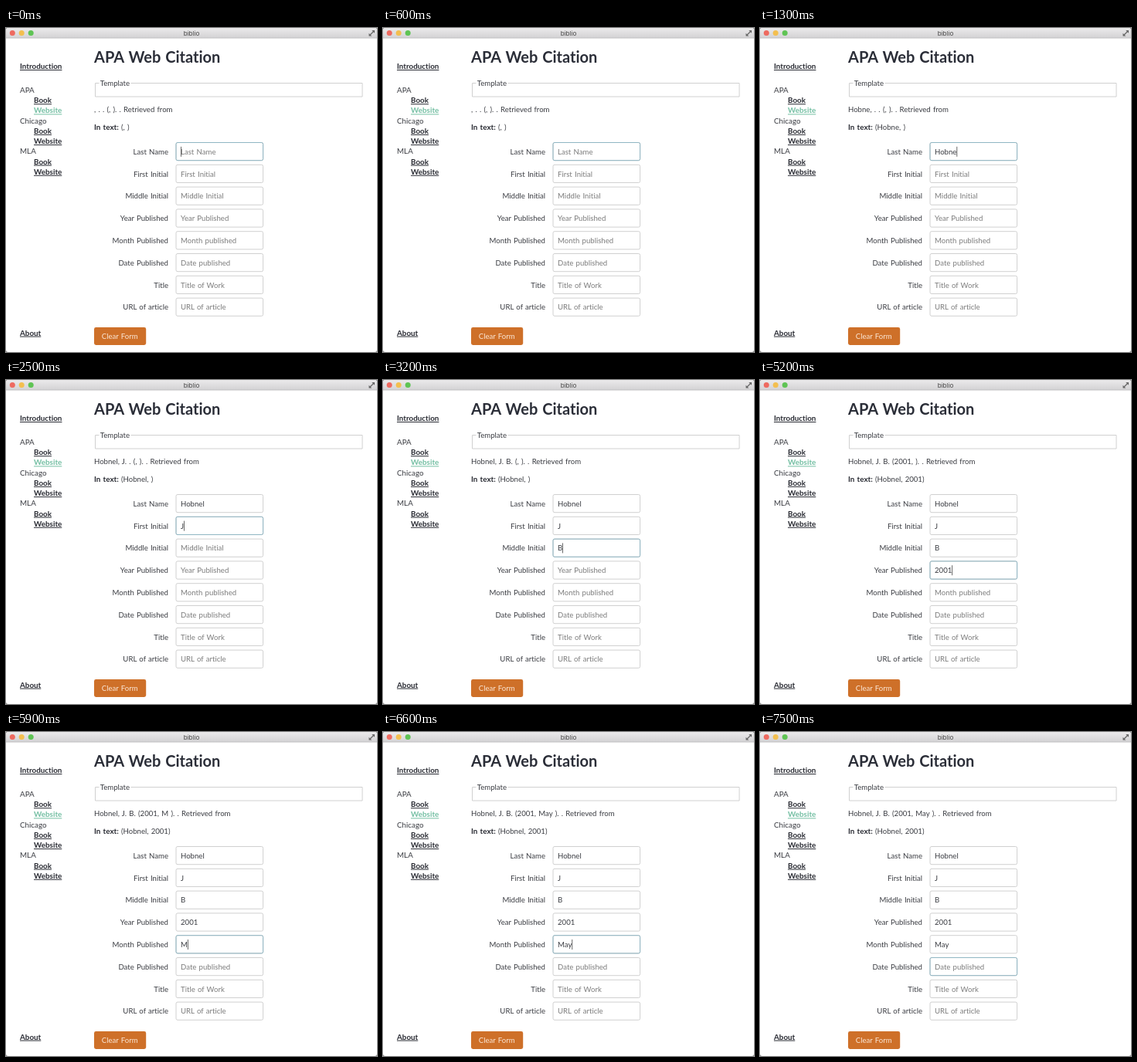
Animation of 480x420 px, one loop 8000 ms. Source, as an HTML page:

```html
<!DOCTYPE html>
<html lang="en">
<head>
<meta charset="utf-8">
<title>biblio</title>
<style>
  html, body { margin: 0; height: 100%; overflow: hidden; background: #8d8d8d; }
  svg { display: block; width: 480px; height: 420px; }
  text {
    font: 9.6px Lato, "Open Sans", sans-serif; font-variant-ligatures: none;
    word-spacing: .8px; fill: #3a3c42;
  }
  .bold { font-size: 9.85px; font-weight: 700; fill: #292b33; }
  .link { text-decoration: underline; }
  .active { fill: #74bfa3; }
  .side { font-size: 9.8px; }
  .label { text-anchor: end; }
  .hint { fill: #7c7c7c; }
  .box { fill: #fff; stroke: #d0d0d0; }
  .focus { fill: none; stroke: #8fb6c3; }
</style>
</head>
<body>
<svg id="stage" viewBox="0 0 480 420">
  <defs>
    <linearGradient id="bar" x2="0" y2="1">
      <stop stop-color="#ebeaeb"/><stop offset="1" stop-color="#d3d2d4"/>
    </linearGradient>
  </defs>
  <rect width="480" height="420" rx="3" fill="#fff"/>
  <path d="M0 13V3Q0 0 3 0H477Q480 0 480 3V13Z" fill="url(#bar)"/>
  <path d="M0 13H480" stroke="#b9b8ba" stroke-width=".8"/>
  <circle cx="8.3" cy="6.5" r="3.5" fill="#ee6a60"/>
  <circle cx="20.2" cy="6.5" r="3.5" fill="#f3bf4f"/>
  <circle cx="32.2" cy="6.5" r="3.5" fill="#5fc454"/>
  <text x="240" y="9.5" text-anchor="middle" style="font:8.1px Inter,sans-serif;fill:#454545">biblio</text>
  <path d="M473.2 3H477V6.8ZM469.5 6.7V10.5H473.3Z" fill="#666"/>
  <path d="M470.5 9.5L476 4" stroke="#666" stroke-width="1.2"/>

  <text x="114" y="45" class="bold" style="font-size:20px;word-spacing:1.2px;fill:#2b2e38">APA Web Citation</text>
  <path d="M120.5 71.5H115.5V89H461V71.5H161.5" fill="none" stroke="#d0d0d0"/>
  <text x="121.7" y="75">Template</text>
  <text id="cite" x="114" y="109"></text>
  <text x="114" y="131.7" class="bold">In text:</text>
  <text id="inText" x="149" y="131.7"></text>

  <rect x="114" y="388" width="67.2" height="23" rx="2.4" fill="#ce7029"/>
  <text x="123.8" y="403.2" style="fill:#fbe8d8">Clear Form</text>
</svg>
<script>
const LOOP = 8000, ROW = 28.8, TOP = 160.3, TEXT_X = 226;
const stage = document.getElementById('stage');
const cite = document.getElementById('cite');
const inText = document.getElementById('inText');

function add(tag, attrs, text = '') {
  const el = document.createElementNS('http://www.w3.org/2000/svg', tag);
  for (const key in attrs) el.setAttribute(key, attrs[key]);
  el.textContent = text;
  return stage.appendChild(el);
}

// Sidebar
const link = (x, y, text, extra = '') => add('text', { x, y, class: 'bold link ' + extra }, text);
link(18, 53, 'Introduction');
['APA', 'Chicago', 'MLA'].forEach((style, i) => {
  const y = 84 + i * 39.7;
  add('text', { x: 18, y, class: 'side' }, style);
  link(36, y + 13.2, 'Book');
  link(36, y + 26.4, 'Website', i ? '' : 'active');
});
link(18, 398.6, 'About');

// Form
const fields = [
  ['Last Name', 'Last Name'], ['First Initial', 'First Initial'],
  ['Middle Initial', 'Middle Initial'], ['Year Published', 'Year Published'],
  ['Month Published', 'Month published'], ['Date Published', 'Date published'],
  ['Title', 'Title of Work'], ['URL of article', 'URL of article']
].map(([label, hint], i) => {
  const y = TOP + i * ROW;
  const box = cls => add('rect', { x: 220, y: y - 11.8, width: 112.6, height: 23.2, rx: 2, class: cls });
  add('text', { x: 210, y: y + 3.4, class: 'label' }, label);
  box('box');
  return { hint, y, ring: box('focus'), text: add('text', { x: TEXT_X, y: y + 3.4 }) };
});
const caret = add('rect', { width: .8, height: 13, fill: '#444' });

// When each field gains focus, and when each of its keys is pressed
const steps = [
  { at: -1000, word: 'Hobnel', keys: [900, 1000, 1100, 1200, 1300, 1500] },
  { at: 1700, word: 'J', keys: [2300] },
  { at: 2700, word: 'B', keys: [3100] },
  { at: 3300, word: '2001', keys: [4500, 4700, 4900, 5100] },
  { at: 5300, word: 'May', keys: [5700, 6100, 6300] },
  { at: 7000, word: '', keys: [] }
];
const FADE = 150;
const clamp = v => Math.max(0, Math.min(1, v));

function draw(t) {
  const values = steps.map(s => s.word.slice(0, s.keys.filter(k => k <= t).length));
  const current = steps.filter(s => s.at <= t).length - 1;

  fields.forEach((f, i) => {
    const value = values[i] || '';
    f.text.textContent = value || f.hint;
    f.text.setAttribute('class', value ? '' : 'hint');
    const gain = i < steps.length ? clamp((t - steps[i].at) / FADE) : 0;
    const loss = i + 1 < steps.length ? clamp((t - steps[i + 1].at) / FADE) : 0;
    f.ring.setAttribute('opacity', gain - loss);
  });

  const [last, first, middle, year, month, date] = values;
  cite.textContent = `${last}, ${first}. ${middle}. (${year}, ${month} ${date}). . Retrieved from`;
  inText.textContent = `(${last}, ${year})`;

  const field = fields[current], step = steps[current];
  const since = t - Math.max(step.at, ...step.keys.filter(k => k <= t));
  const width = values[current] ? field.text.getComputedTextLength() : 0;
  caret.setAttribute('x', TEXT_X + width);
  caret.setAttribute('y', field.y - 6.5);
  caret.setAttribute('opacity', since % 1000 < 500 ? 1 : 0);
}

function tick() {
  draw(performance.now() % LOOP);
  requestAnimationFrame(tick);
}
tick();
</script>
</body>
</html>
```
